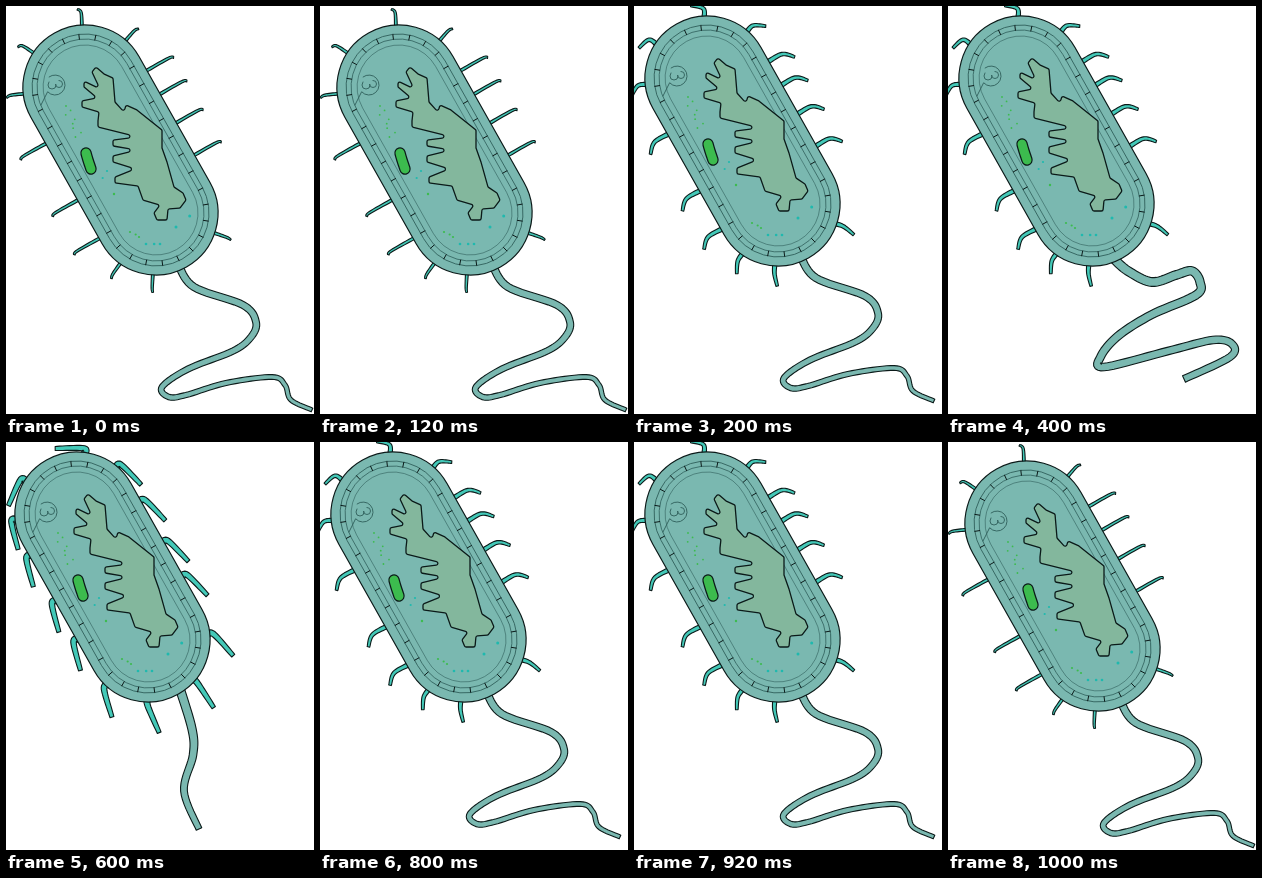
An HTML page with a canvas for the animation above (1200 ms loop, 308 px wide and 408 px high).

```html
<!DOCTYPE html>
<html lang="en">
<head>
<meta charset="utf-8">
<title>Swimming bacterium</title>
<style>
html, body { margin: 0; width: 100%; height: 100%; overflow: hidden; background: #fff; }
canvas { display: block; }
</style>
</head>
<body>
<canvas id="stage" width="308" height="408"></canvas>
<script>
const ctx = document.getElementById('stage').getContext('2d');
const INK = '#0b1a19', SKIN = '#7ab8b0', HAIR = '#43c9b8', FINE = '#2f5f5b';
const GREEN = '#3cbb4e', TEAL = '#1fb9ae';
const STEP = 200;

// The cell is a capsule: a head cap, two straight sides and a tail cap
const HEAD = [79, 81], TAIL = [150, 207], RADIUS = 62;
const SIDE = Math.hypot(TAIL[0] - HEAD[0], TAIL[1] - HEAD[1]);
const ANGLE = Math.atan2(TAIL[1] - HEAD[1], TAIL[0] - HEAD[0]);
const AXIS = [Math.cos(ANGLE), Math.sin(ANGLE)];

const move = (p, dir, d) => [p[0] + dir[0] * d, p[1] + dir[1] * d];
const dot = (a, b) => a[0] * b[0] + a[1] * b[1];
const unit = v => move([0, 0], v, 1 / (Math.hypot(...v) || 1));
const pairs = list => list.flatMap((v, i) => i % 2 ? [] : [[v, list[i + 1]]]);

// Centre-line foot and outward normal at distance s, clockwise from the head's right shoulder
function rim(s) {
  const arc = Math.PI * RADIUS, total = 2 * (SIDE + arc);
  s = (s % total + total) % total;
  const half = s < SIDE + arc ? 0 : 1;
  const d = s - half * (SIDE + arc), along = Math.min(d, SIDE);
  const turn = ANGLE - Math.PI / 2 + half * Math.PI + (d - along) / RADIUS;
  return {
    foot: move(HEAD, AXIS, half ? SIDE - along : along),
    normal: [Math.cos(turn), Math.sin(turn)]
  };
}

// Catmull-Rom curve through the key points
function spline(pts, steps = 10) {
  const last = pts.length - 1, out = [];
  for (let i = 0; i < last; i++) {
    const [a, b, c, d] = [-1, 0, 1, 2].map(k => pts[Math.max(0, Math.min(last, i + k))]);
    for (let s = 0; s < steps; s++) {
      const t = s / steps;
      out.push([0, 1].map(k => b[k] + 0.5 * t * (c[k] - a[k]
        + t * (2 * a[k] - 5 * b[k] + 4 * c[k] - d[k]
        + t * (3 * b[k] - a[k] - 3 * c[k] + d[k])))));
    }
  }
  return [...out, pts[last]];
}

function paint(path, fill, stroke, width = 1) {
  if (fill) { ctx.fillStyle = fill; ctx.fill(path); }
  if (stroke) { ctx.strokeStyle = stroke; ctx.lineWidth = width; ctx.stroke(path); }
}

function trace(pts, closed) {
  const path = new Path2D();
  pts.forEach(p => path.lineTo(...p));
  if (closed) path.closePath();
  return path;
}

function rounded(pts, r) {
  const path = new Path2D(), n = pts.length;
  path.moveTo((pts[0][0] + pts[n - 1][0]) / 2, (pts[0][1] + pts[n - 1][1]) / 2);
  pts.forEach((p, i) => path.arcTo(...p, ...pts[(i + 1) % n], r));
  path.closePath();
  return path;
}

// Outlined strip along a curve, tapering from one width to another
function ribbon(pts, [from, to], fill) {
  const mid = spline(pts), left = [], right = [], last = mid.length - 1;
  mid.forEach((p, i) => {
    const a = mid[Math.max(0, i - 1)], b = mid[Math.min(last, i + 1)];
    const [dx, dy] = unit([b[0] - a[0], b[1] - a[1]]);
    const h = (from + (to - from) * i / last) / 2;
    left.push(move(p, [-dy, dx], h));
    right.unshift(move(p, [dy, -dx], h));
  });
  paint(trace([...left, ...right], true), fill, INK, 1.1);
}

function capsule(inset) {
  const path = new Path2D(), r = RADIUS - inset, q = Math.PI / 2;
  path.arc(...HEAD, r, ANGLE + q, ANGLE - q);
  path.arc(...TAIL, r, ANGLE - q, ANGLE + q);
  path.closePath();
  return path;
}

function wall(outer, inner) {
  paint(capsule(outer), null, FINE, 0.9);
  paint(capsule(inner), null, FINE, 0.8);
  for (let s = 6; s < 2 * (SIDE + Math.PI * RADIUS); s += 20) {
    const { foot, normal } = rim(s);
    paint(trace([outer, inner].map(d => move(foot, normal, RADIUS - d))), null, INK, 1);
  }
}

// Right edge as key points, left edge as a comb of blunt fingers
const edge = pairs([86,66, 90,61, 98,68, 107,72, 109,96, 118,106, 120,99, 131,104,
  156,124, 156,142, 161,156, 168,181, 177,187, 180,194, 174,202, 162,203,
  161,214, 151,214, 148,207, 154,199, 137,194, 132,180]);
const fingers = [[109, 174, 129, 163], [107, 153, 131, 144], [107, 137, 132, 131],
  [92, 118, 93, 106], [76, 98, 91, 92], [78, 78, 94, 83]];
const comb = fingers.flatMap(([x, y, nx, ny]) => [[x, y + 3], [x, y - 3], [nx, ny]]);
const nucleoid = rounded([...edge, ...comb], 1.8);
const bean = trace(spline([[80, 147], [82, 154], [85, 163]]));

function coil(x, y) {
  const path = new Path2D();
  path.moveTo(x - 14, y + 20);
  path.arc(x, y, 10, 2.4, -2.2, true);
  path.moveTo(x - 6, y - 3);
  path.arc(x - 3, y, 4, Math.PI, 0, true);
  path.arc(x + 4, y - 1, 3.5, Math.PI, -1.6, true);
  paint(path, null, FINE, 0.9);
}

// A loose row of specks between two points
function specks(x1, y1, x2, y2, count, color, size) {
  for (let i = 0; i < count; i++) {
    const t = count > 1 ? i / (count - 1) : 0, sway = Math.sin(i * 2.4) * (count > 3 ? 4 : 1);
    const path = new Path2D();
    path.arc(x1 + (x2 - x1) * t + sway, y1 + (y2 - y1) * t, size, 0, 7);
    paint(path, color);
  }
}

function body() {
  paint(capsule(0), SKIN, INK, 1.2);
  wall(9, 14);
  paint(capsule(20), null, FINE, 0.6);
  coil(49, 79);
  paint(nucleoid, '#83b79d', INK, 1.3);
  paint(bean, null, INK, 11.5);
  paint(bean, null, GREEN, 9);
  specks(60, 100, 73, 131, 8, GREEN, 0.9);
  specks(108, 188, 108, 188, 1, GREEN, 1.2);
  specks(124, 226, 134, 231, 3, GREEN, 1.1);
  specks(101, 165, 96, 172, 2, TEAL, 1.1);
  specks(140, 238, 155, 238, 3, TEAL, 1.3);
  specks(170, 221, 183, 210, 2, TEAL, 1.5);
}

// Each hair leaves along the normal, then leans back over the cell
function hair(s, { out, stub, bend, lean, width }) {
  const { foot, normal } = rim(s), facing = dot(normal, AXIS);
  const reach = Math.abs(facing) > 0.2 ? out * stub : out;
  const drift = facing < -0.4 ? move([2 * normal[1], -2 * normal[0]], normal, -0.5) : AXIS;
  const root = move(foot, normal, RADIUS - 3);
  const knee = move(root, normal, reach + 3);
  const tip = move(knee, unit(move(normal, drift, lean)), bend);
  ribbon([root, knee, tip], width, HAIR);
}

// Hair positions around the rim
const spread = [-21, 16, 43, 76, 113, 197, 277, 312, 345, 389, 454, 509, 552, 610];
const slid = [-21, 21, 68, 107, 171, 221, 274, 319, 374, 418, 470, 509, 550, 620];

const straight = { spots: spread, out: 25, stub: 0.5, bend: 5, lean: 0.4, width: [3, 1.6] };
const curled = { spots: spread, out: 15, stub: 0.5, bend: 13, lean: 0.9, width: [4.6, 2.6] };
const swept = { spots: slid, out: 4, stub: 1, bend: 29, lean: 3.6, width: [7, 4] };

const long = pairs([172,258, 188,281, 237,299, 250,316, 245,331, 227,345, 182,363,
  156,381, 163,391, 180,389, 220,377, 266,371, 279,379, 285,394, 306,404]);
const folded = pairs([171,261, 186,274, 210,285, 234,278, 250,274, 258,285, 254,298,
  209,318, 176,339, 159,359, 162,370, 226,354, 271,343, 290,347, 288,360, 242,382]);
const droop = pairs([180,250, 194,296, 195,322, 186,358, 201,396]);

const rest = { at: [0, 0], hairs: straight, tail: long, thick: [7.5, 4] };
const curl = { at: [-6, -9], hairs: curled, tail: long, thick: [7.5, 4] };
const fold = { ...curl, tail: folded, thick: [9, 7] };
const sweep = { at: [-8, -9], hairs: swept, tail: droop, thick: [9, 6] };
const poses = [rest, curl, fold, sweep, curl, rest];

function draw({ at, hairs, tail, thick }) {
  ctx.fillStyle = '#fff';
  ctx.fillRect(0, 0, 308, 408);
  ctx.lineJoin = ctx.lineCap = 'round';
  ctx.save();
  ctx.translate(...at);
  ribbon(tail, thick, SKIN);
  hairs.spots.forEach(s => hair(s, hairs));
  body();
  ctx.restore();
}

const start = performance.now();
function play() {
  const t = Math.max(0, performance.now() - start);
  draw(poses[Math.floor(t / STEP) % poses.length]);
  requestAnimationFrame(play);
}
play();
</script>
</body>
</html>
```
